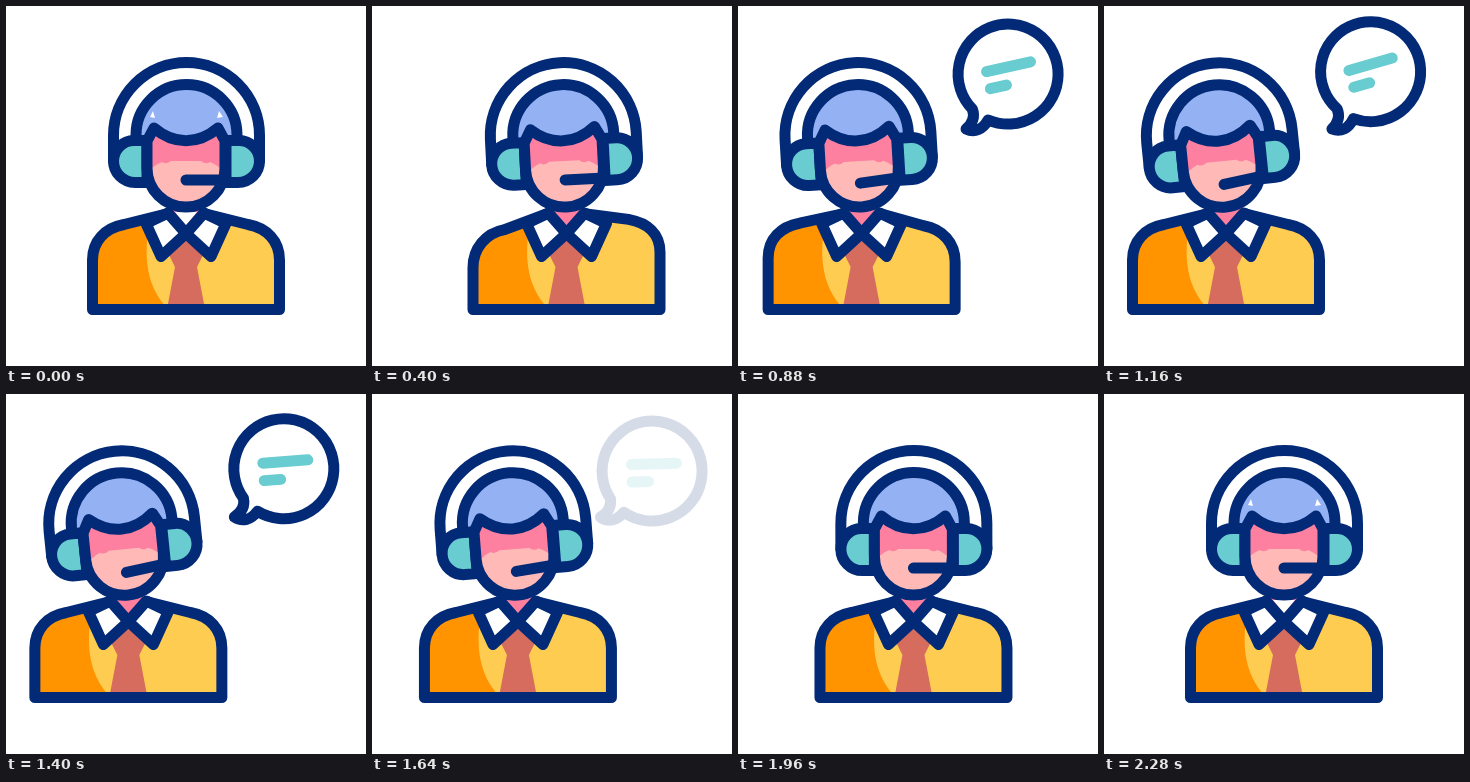
These frames come from a looping animation (360 px wide and 360 px high, 3000 ms). An HTML page:

```html
<!DOCTYPE html>
<html lang="en">
<head>
<meta charset="utf-8">
<title>Support agent</title>
<style>
  html, body { margin: 0; width: 100%; height: 100%; overflow: hidden; background: #fff; }
  svg { display: block; width: 100%; height: 100%; }
  .line { stroke: #022a76; stroke-width: 11; stroke-linecap: round; stroke-linejoin: round; fill: none; }
  .white { fill: #fff; }
  .teal { fill: #68ccd0; }
  .words { stroke: #68ccd0; stroke-width: 11; stroke-linecap: round; }
</style>
</head>
<body>
<svg viewBox="0 0 360 360">
  <defs>
    <path id="torso"/>
    <path id="collar" d="M162 207L140 217.500L155 250.500L180 227.500Z"/>
    <path id="cup" d="M141 134.500H128A20.500 20.500 0 0 0 107.500 155A21.500 21.500 0 0 0 129 176.500H141Z"/>
    <path id="arch" d="M130 134V129A50.500 50.500 0 0 1 231 129V134"/>
    <path id="face" d="M141 162V135L148 122C168 139 192 139 212 122L219 135V162A39 39 0 0 1 141 162Z"/>
    <clipPath id="faceArea"><use href="#face"/></clipPath>
    <clipPath id="sleeve"><path d="M80 200H147C136 245 138 279 163 304H80Z"/></clipPath>
  </defs>

  <g id="person">
    <use href="#torso" fill="#ffcc52"/>
    <use href="#torso" fill="#ff9300" clip-path="url(#sleeve)"/>
    <path fill="#d66c5d" d="M180 230L197 249L191 261L199 303H161L169 261L163 249Z"/>
    <use href="#torso" class="line"/>
    <path fill="#ff7f9f" d="M163 195H197V207L180 227L163 207Z"/>
    <path class="white rest" d="M169 206H191L180 220Z"/>
    <use href="#collar" class="line white"/>
    <use href="#collar" class="line white" transform="matrix(-1 0 0 1 360 0)"/>

    <g id="head">
      <path class="line" d="M107.500 155V129.500A73 73 0 0 1 253.500 129.500V155"/>
      <use href="#arch" fill="#94b1f3"/>
      <path class="white rest" d="M147 105L149 112L144 111ZM213 105L217 111L211 112Z"/>
      <use href="#arch" class="line"/>
      <use href="#cup" class="line teal"/>
      <use href="#cup" class="line teal" transform="matrix(-1 0 0 1 361 0)"/>
      <path fill="#94b1f3" d="M141 130H219L212 122C192 139 168 139 148 122Z"/>
      <use href="#face" fill="#ffbab7"/>
      <path clip-path="url(#faceArea)" fill="#fd80a1" d="M140 168Q148 159 156 156Q160 159 165 155H195Q200 159 204 156Q212 159 220 168V110H140Z"/>
      <use href="#face" class="line"/>
      <path id="mic" class="line" d="M180 174H219"/>
    </g>
  </g>

  <g id="bubble">
    <path class="line white" d="M239 105C240 113 236 119 228.500 123C236 129 245 127 252 119A50 50 0 1 0 239 105Z"/>
    <path class="words" d="M261 71.500H306M261 89H277.500"/>
  </g>
</svg>
<script>
const LOOP = 3000, STEP = 40;
const byId = id => document.getElementById(id);
const turn = (id, angle, pivot) => byId(id).setAttribute("transform", `rotate(${angle} ${pivot})`);

const linear = u => u;
const smooth = u => u * u * (3 - 2 * u);
const clamp = (v, lo, hi) => Math.min(hi, Math.max(lo, v));

// Cubic bezier (.42, 0, .16, 1), solved for x by bisection.
function glide(x) {
  let lo = 0, hi = 1;
  for (let i = 0; i < 24; i++) {
    const s = (lo + hi) / 2, r = 1 - s;
    if (1.26 * r * r * s + 0.48 * r * s * s + s * s * s < x) lo = s;
    else hi = s;
  }
  return smooth(lo);
}

const ramp = (t, from, to, ease = smooth) => ease(clamp((t - from) / (to - from), 0, 1));

// Torso outline; a positive lean lowers the left shoulder and lifts the right one.
function torsoPath(lean) {
  const left = y => y + lean, right = y => y - lean;
  return `M86.5 303.5V${left(254 + lean / 2)}C86.5 ${left(235 + lean / 2)} 99 ${left(222)} 118 ${left(218.5)}`
    + `L160 208H200L242 ${right(218.5)}`
    + `C261 ${right(222)} 273.5 ${right(235 - lean / 2)} 273.5 ${right(254 - lean / 2)}V303.5Z`;
}

function draw(time) {
  const t = Math.floor((time % LOOP) / STEP) * STEP;

  const slide = 14.5 * ramp(t, 120, 400, glide) - 72.5 * ramp(t, 400, 1000, glide) + 58 * ramp(t, 1350, 2280, glide);
  const sway = -3 * ramp(t, 120, 400) + 5.6 * ramp(t, 400, 660) - 2.6 * ramp(t, 660, 1000);
  const nod = -5.8 * (ramp(t, 660, 1000) - ramp(t, 1480, 2000));
  byId("person").setAttribute("transform", `translate(${slide} 0)`);
  byId("torso").setAttribute("d", torsoPath(-1.7 * sway));
  turn("head", sway + nod, "180 200");
  turn("mic", 1.1 * nod, "219 174");

  const beat = (clamp(t, 840, 1480) - 840) / 320;
  const rock = -4.3 - 11.7 * Math.cos(2 * Math.PI * beat);
  turn("bubble", rock * (ramp(t, 600, 840) - ramp(t, 1480, 1680)), "228 125");
  byId("bubble").setAttribute("opacity", ramp(t, 600, 850, linear) - ramp(t, 1430, 1680, linear));

  const resting = t < 160 || t >= 2280;
  for (const light of document.querySelectorAll(".rest")) {
    light.setAttribute("visibility", resting ? "visible" : "hidden");
  }
}

const start = performance.now();
function tick() {
  draw(performance.now() - start);
  requestAnimationFrame(tick);
}
tick();
</script>
</body>
</html>
```
